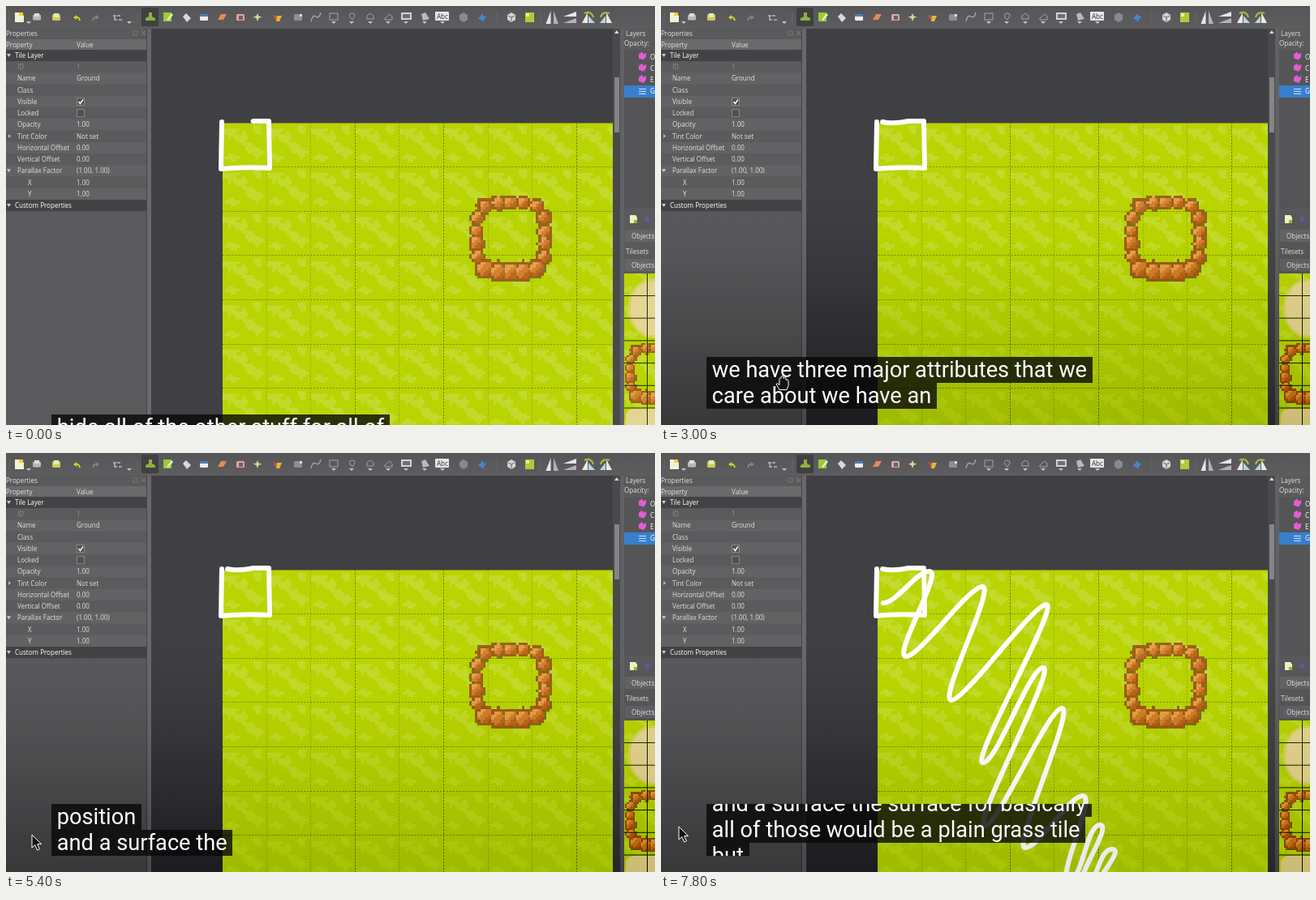
Write an HTML page that moves like this. It is 800 px wide and 517 px high and loops after 8 s.

```html
<!DOCTYPE html>
<html lang="en">
<head>
<meta charset="utf-8">
<title>Map editor walkthrough</title>
<style>
html, body { margin: 0; width: 100%; height: 100%; overflow: hidden; background: #5a5a5c; }
svg { position: absolute; left: 0; top: 0; }
svg text { font: 8.05px "Open Sans", "Noto Sans", sans-serif; fill: #e2e2e2; }
.pixels { shape-rendering: crispEdges; }
.ink { fill: none; stroke: #fff; stroke-width: 6; stroke-linecap: round; stroke-linejoin: round; }
.shade { position: absolute; left: 0; top: 230px; width: 800px; height: 287px; }
.burn { background: linear-gradient(#fff, #f4f4f4 40%, #d9d9d9); mix-blend-mode: color-burn; }
.dim { background: linear-gradient(transparent 20%, rgba(0,0,0,.09)); }
#captions { position: absolute; left: 56px; width: 700px; height: 64px; overflow: hidden; }
#captions p { margin: 0; padding: 0 .25em; width: fit-content; height: 32px; white-space: pre;
  font: 27.2px/32px Roboto, sans-serif; color: #fff; background: rgba(8,8,8,.8); }
</style>
</head>
<body>
<svg id="scene" width="800" height="517" viewBox="0 0 800 517">
  <defs>
    <linearGradient id="bar" x2="0" y2="1"><stop stop-color="#565658"/><stop offset="1" stop-color="#5d5d5f"/></linearGradient>
    <pattern id="grass" width="16" height="16" patternUnits="userSpaceOnUse" patternTransform="translate(267 144.5) scale(3.41)">
      <rect width="16" height="16" fill="#b9d403"/>
      <path id="tufts" class="pixels" fill="#c3da2c"/>
    </pattern>
    <g id="rocks" class="pixels"></g>
  </defs>
  <rect width="800" height="517" fill="#5a5a5c"/>
  <g id="properties"></g>
  <rect x="174" y="28" width="5" height="489" fill="#69696b"/>
  <rect x="179" y="28" width="569" height="489" fill="#403f43"/>
  <rect x="267" y="144.5" width="481" height="373" fill="url(#grass)"/>
  <g id="grid" stroke="#66780a" stroke-dasharray="2.4 1.6"></g>
  <use href="#rocks" transform="translate(571 234) scale(3.41)"/>
  <g id="side"></g>
  <g id="tools"></g>
  <path id="box" class="ink" pathLength="1" d="M266 143L265 201Q295 198 325 200L324 142L305 142Q285 146 273 143"/>
  <path id="scribble" class="ink" pathLength="1"/>
</svg>
<div class="shade burn"></div>
<div class="shade dim"></div>
<div id="captions"><div id="roll"></div></div>
<svg width="800" height="517" viewBox="0 0 800 517">
  <g id="cursor" fill="#111" stroke="#fff" stroke-linejoin="round">
    <path id="arrow" d="M0 0V16L3.8 12.6L6.6 19L9.4 17.7L6.7 11.6H11.5Z"/>
    <path id="hand" d="M-4 8L-8 1Q-7 -1 -4 2V-6Q-3 -8 -2 -6V-8Q0 -10 1 -8V-6Q3 -9 4 -6V-4Q6 -6 7 -3V3L5 8Z"/>
  </g>
</svg>
<script>
const $ = id => document.getElementById(id);
const clamp = v => Math.max(0, Math.min(1, v));
const hash = (x, y) => { const v = Math.sin(x * 12.9898 + y * 78.233) * 43758.5453; return v - Math.floor(v); };
const rect = (x, y, w, h, fill, extra = '') => `<rect x="${x}" y="${y}" width="${w}" height="${h}" fill="${fill}" ${extra}/>`;
const label = (x, mid, text, fill = '#e2e2e2') => `<text x="${x}" y="${mid + 3}" style="fill:${fill}">${text}</text>`;
const shape = (d, fill, extra = '') => `<path d="${d}" fill="${fill}" ${extra}/>`;
const line = (d, color, width = 1.5) => shape(d, 'none', `stroke="${color}" stroke-width="${width}"`);
const cell = (x, y) => `M${x} ${y}h1v1h-1z`;

function drawGrass() {
  const blobs = [[3, 3, 3, 2], [6, 5, 2.6, 2], [9, 8, 2.5, 2], [12, 10, 2.6, 1.8], [12, 2, 2, 1.5], [3, 12, 2, 1.5]];
  const wrap = d => Math.min(Math.abs(d), 16 - Math.abs(d));
  let d = '';
  for (let y = 0; y < 16; y++) for (let x = 0; x < 16; x++) {
    const near = Math.min(...blobs.map(([bx, by, rx, ry]) => Math.hypot(wrap(x - bx) / rx, wrap(y - by) / ry)));
    if (near + hash(x, y) * .6 < 1.2) d += cell(x, y);
  }
  $('tufts').setAttribute('d', d);
}

// A ring of pixel rocks, lit from the upper left.
function drawRocks() {
  const count = 18;
  const rocks = Array.from({ length: count }, (_, i) => {
    const a = (i + .5) / count * 2 * Math.PI, c = Math.cos(a), s = Math.sin(a);
    const k = (c ** 4 + s ** 4) ** -.25;
    return { x: 15 + 12.3 * k * c, y: 15 + 12.5 * k * s, r: 2.1 + hash(i, 3) * .6 + (s > .6 ? .6 : 0) };
  });
  const layers = {};
  for (let y = 0; y < 31; y++) for (let x = 0; x < 31; x++) {
    let best = { d: 9 };
    for (const r of rocks) {
      const dx = (x + .5 - r.x) / r.r, dy = (y + .5 - r.y) / r.r, d = Math.hypot(dx, dy);
      if (d < best.d) best = { d, lit: dx + dy };
    }
    if (best.d > 1.25) continue;
    const color = best.d > 1.08 ? '#84701f' : best.d > .85 ? '#a75b1a' : best.lit < -.4 ? '#e3a14b' : best.lit < .4 ? '#d08230' : '#ba6a1f';
    layers[color] = (layers[color] || '') + cell(x, y);
  }
  $('rocks').innerHTML = Object.entries(layers).map(([color, d]) => shape(d, color)).join('');
}

function drawGrid() {
  const step = 54.6;
  let out = '';
  for (let i = 1; i < 9; i++) {
    const x = Math.round(267 + i * step) - .5;
    out += `<path d="M${x} 144V517" opacity="${[3, 5, 8].includes(i) ? .85 : .35}"/>`;
  }
  for (let i = 1; i < 7; i++) {
    const y = Math.round(144.5 + i * step) - .5;
    out += `<path d="M267 ${y}H748" opacity=".65"/>`;
  }
  $('grid').innerHTML = out;
}

function drawProperties() {
  const rows = [['Tile Layer'], ['ID', '1'], ['Name', 'Ground'], ['Class', ''], ['Visible', ''], ['Locked', ''], ['Opacity', '1.00'],
    ['Tint Color', 'Not set'], ['Horizontal Offset', '0.00'], ['Vertical Offset', '0.00'], ['Parallax Factor', '(1.00, 1.00)'],
    ['X', '1.00'], ['Y', '1.00'], ['Custom Properties']];
  let out = label(0, 34, 'Properties') + rect(0, 41, 174, 13, '#6a6a6c') + label(0, 47.5, 'Property') + label(87, 47.5, 'Value')
    + rect(157, 31, 5, 5, 'none', 'stroke="#777"') + line('M167 31l5 5m0-5l-5 5', '#888', 1);
  rows.forEach(([name, value], i) => {
    const mid = 61 + i * 14.23, group = value === undefined;
    const tone = name === 'ID' ? '#929294' : group ? '#fff' : '#e2e2e2';
    const x = group ? 11 : name.length === 1 ? 27 : 14;
    out += rect(0, mid - 7, 174, 14.23, group ? '#434345' : i % 2 ? '#5b5b5d' : '#626264');
    out += label(x, mid, name, tone) + label(87, mid, value || '', tone);
    if (group || name === 'Parallax Factor') out += shape(`M1 ${mid - 2}h5l-2.5 4z`, '#ccc');
    if (name === 'Tint Color') out += shape(`M3 ${mid - 2.5}v5l3-2.5z`, '#bbb');
    if (name === 'Visible' || name === 'Locked') out += rect(87.5, mid - 4.5, 9, 9, '#505052', 'stroke="#89898b"');
    if (name === 'Visible') out += line(`M89.5 ${mid}l2 2.5l3.5-5`, '#fff');
  });
  $('properties').innerHTML = out + rect(173, 28, 1, 489, '#48484a');
}

function drawSide() {
  const sand = '#e4d592';
  let out = rect(748, 28, 52, 489, '#5a5a5c') + rect(748, 28, 9, 489, '#4a4a4c') + rect(750, 88, 6, 68, '#858587')
    + shape('M750 34l2.8-4l2.8 4z', '#ddd') + rect(757, 28, 5, 489, '#626264')
    + label(764, 34, 'Layers') + label(762, 46, 'Opacity:') + rect(762, 55, 38, 195, '#555557') + rect(762, 98, 38, 15, '#387fcd');
  ['O', 'C', 'E', 'G'].forEach((letter, i) => {
    const y = 62.5 + i * 14.3;
    out += label(794, y, letter, '#fff');
    out += i < 3 ? shape(`M780 ${y - 3}l4-3l2 3l3-2v5l-3 4l-6-2z`, '#e45bd6')
      : line(`M780 ${y - 3}h9m-9 3h9m-9 3h9`, '#d8e6f6', 1);
  });
  out += shape('M769 258h7l2 3v7h-9z', '#f2f0c0') + rect(774, 264, 4, 4, '#8dbb2c') + shape('M786 263l4-4l4 4l-4 4z', '#7053a0')
    + rect(763, 276, 37, 15, '#656567') + label(771, 283.5, 'Objects')
    + label(764, 303, 'Tilesets') + rect(763, 312, 37, 15, '#656567') + label(771, 320, 'Objects')
    + rect(762, 330, 38, 187, 'url(#grass)')
    + `<ellipse cx="796" cy="373" rx="28" ry="35" fill="${sand}" stroke="#d3d25c" stroke-width="3"/>`
    + `<use href="#rocks" transform="translate(763 416) scale(2.45)"/>`
    + rect(764, 497, 50, 40, sand, 'rx="9"');
  let grid = 'M790.5 330V517';
  for (let y = 357.5; y < 517; y += 27.7) grid += `M762 ${y}H800`;
  $('side').innerHTML = out + line(grid, '#26300c', 1);
}

function drawTools() {
  const gray = '#a3a3a5';
  const page = (x, fill) => shape(`M${x - 5} 8h7l4 4v8h-11z`, fill);
  const block = (x, fill, h = 8) => rect(x - 5, 14 - h / 2, 10, h, fill, 'rx="1.5"');
  const gem = (x, fill) => shape(`M${x} 8l5 3v6l-5 3l-5-3v-6z`, fill);
  const caret = x => shape(`M${x - 3} 19h6l-3 3z`, '#c4c4c6');
  let out = rect(0, 0, 800, 28, 'url(#bar)') + rect(167, 2, 21, 23, '#404042', 'rx="2"');
  out += page(16, '#f4f1d2') + rect(16, 8, 5, 4, '#ecd53d') + caret(28)
    + block(38, '#b9b9b4', 7) + rect(35, 9, 6, 4, '#deded8')
    + block(62, '#c8cd55') + rect(59, 9, 6, 5, '#eee7b2')
    + line('M91 18q-1-5-5-4', '#d3cf2c', 2) + shape('M83 14l4-3v6z', '#d3cf2c')
    + line('M107 18q1-5 5-4', '#858587', 2) + shape('M115 14l-4-3v6z', '#858587')
    + line('M132 12h4m-2 0v5h3m0-5h4m-2 5h4', '#b8b8ba') + caret(152);
  out += shape('M176 8h4v5l4 2v3h-12v-3l4-2z', '#8fae43')
    + rect(194, 8, 10, 11, '#9acb38') + shape('M198 17l6-8l2 2l-6 7z', '#eee8c7')
    + shape('M218 13l4-4l6 6l-5 5z', '#d9d9dc') + block(244, '#e9edf4') + rect(239, 10, 10, 3, '#4d7cba')
    + shape('M261 17l4-7h7l-4 7z', '#e78a55') + block(289, '#d9a5a8') + rect(287, 12, 5, 5, '#716065')
    + shape('M310 9l1.5 3.5l4 1l-4 1.5l-1.5 4l-1.5-4l-4-1.5l4-1z', '#ded492')
    + shape('M329 10l6 4l-3 3z', '#dd4a42') + shape('M334 12h6l-3 7h-4z', '#dfb932');
  out += block(360, '#8f8f91') + rect(362, 10, 3, 3, '#ddd') + line('M376 19q2-9 6-6t6-5', gray)
    + rect(399, 9, 10, 8, 'none', `stroke="${gray}"`) + line('M427 9q-5 0-3 5l3 3l3-5q0-3-3-3z', gray, 1)
    + line('M449 9l4 3v4h-8v-4z', gray, 1) + line('M467 17h9v-4l-3-3l-6 5z', gray, 1)
    + rect(487, 8, 13, 9, '#d2d2d4') + rect(489, 10, 9, 5, '#6e7075') + shape('M512 10l5-2l5 8l-8 2z', '#b9b9bb')
    + rect(529, 7, 17, 11, '#e7e7e9', 'rx="1"') + label(531, 12.5, 'Abc', '#333')
    + gem(564, '#858991') + shape('M587 9l1.5 3l4 1l-3 3l-1 4l-3-3l-4-1l3-3z', '#4b83c9');
  for (const x of [404, 426, 449, 471, 493, 516, 538]) out += caret(x);
  out += gem(623, '#d4d4d4') + line('M619 12l4 2l4-2m-4 2v5', '#666', 1)
    + rect(640, 8, 11, 12, '#a9ce38') + rect(641, 9, 4, 4, '#efe8a0')
    + shape('M671.5 6v16h-6z', '#e6e6e8') + shape('M675 6v16h6z', '#b2b2b5')
    + shape('M703 7v6h-16z', '#e6e6e8') + shape('M703 15v6h-16z', '#b2b2b5')
    + shape('M710 21h7v-13z', '#eceade') + shape('M718 21h8l-8-9z', '#b9d3e2') + line('M713 9q8-4 11 5', '#a9bd35', 2)
    + shape('M732 21h7v-9z', '#b9d3e2') + shape('M740 21h7l-7-13z', '#eceade') + line('M733 14q2-8 11-5', '#a9bd35', 2);
  out += line('M4 8v12M162 7v14M605 7v14M659 7v14', '#68686a', 1);
  $('tools').innerHTML = out;
}

function drawScribble() {
  const turns = [[274, 185], [331, 146], [302, 251], [396, 165], [358, 305], [475, 187], [397, 382], [471, 265], [399, 460],
    [494, 315], [449, 487], [520, 423], [503, 527], [541, 459], [522, 532], [556, 489], [545, 532]];
  const reach = 17;
  $('scribble').setAttribute('d', turns.map(([x, y], i) => {
    if (!i) return `M${x} ${y}`;
    const [px, py] = turns[i - 1];
    return `C${px + reach} ${py} ${x - reach} ${y} ${x} ${y}`;
  }).join(''));
}

// Caption lines: text, start time, time per word.
const lines = [
  ['hide all of the other stuff for all of', -4000, 200],
  ['the tiles for example for this top tile', -2000, 200],
  ['we have three major attributes that we', 635, 170],
  ['care about we have an X position a y', 1960, 200],
  ['position', 3900, 200],
  ['and a surface the surface for basically', 4500, 215],
  ['all of those would be a plain grass tile', 6050, 120],
  ['but', 7600, 200]
].map(([text, start, pace]) => ({ words: text.split(' '), start, pace, el: $('roll').appendChild(document.createElement('p')) }));

const pointer = [[1000, 442, 366], [2200, 258, 464], [3800, 42, 467], [5400, 32, 471], [6800, 28, 465], [7800, 22, 461]];

function pointerAt(t) {
  const i = Math.max(1, pointer.findIndex(p => p[0] >= t));
  const [t0, x0, y0] = pointer[i - 1], [t1, x1, y1] = pointer[i];
  const k = clamp((t - t0) / (t1 - t0));
  return [x0 + (x1 - x0) * k, y0 + (y1 - y0) * k];
}

function reveal(path, amount) {
  path.style.visibility = amount > 0 ? 'visible' : 'hidden';
  path.style.strokeDasharray = amount < 1 ? `${amount} 2` : 'none';
}

function render(t) {
  reveal($('box'), clamp(.86 + t / 2800));
  reveal($('scribble'), clamp((t - 5450) / 1250));

  const controls = t >= 1200;
  for (const el of document.querySelectorAll('.shade')) el.style.visibility = controls ? 'visible' : 'hidden';
  $('captions').style.top = controls ? '433px' : '504px';
  let scroll = 0;
  lines.forEach(({ words, start, pace, el }, i) => {
    const age = t - start;
    const count = age < 0 ? 0 : 1 + Math.max(0, Math.floor((age - 100) / pace));
    el.textContent = words.slice(0, count).join(' ');
    el.style.visibility = count ? 'visible' : 'hidden';
    if (i > 1) scroll += clamp(age / 400);
  });
  $('roll').style.transform = `translateY(${-32 * scroll}px)`;

  const [x, y] = pointerAt(t);
  const overCaption = controls && x > 56 && y > 433;
  $('cursor').style.display = t < 1000 ? 'none' : '';
  $('cursor').setAttribute('transform', `translate(${x} ${y})`);
  $('arrow').style.display = overCaption ? 'none' : '';
  $('hand').style.display = overCaption ? '' : 'none';
}

drawGrass();
drawRocks();
drawGrid();
drawProperties();
drawSide();
drawTools();
drawScribble();

const loop = 8000, tick = 200, begin = performance.now();
function frame() {
  const t = (performance.now() - begin) % loop;
  render(Math.floor(t / tick) * tick);
  requestAnimationFrame(frame);
}
frame();
</script>
</body>
</html>
```
